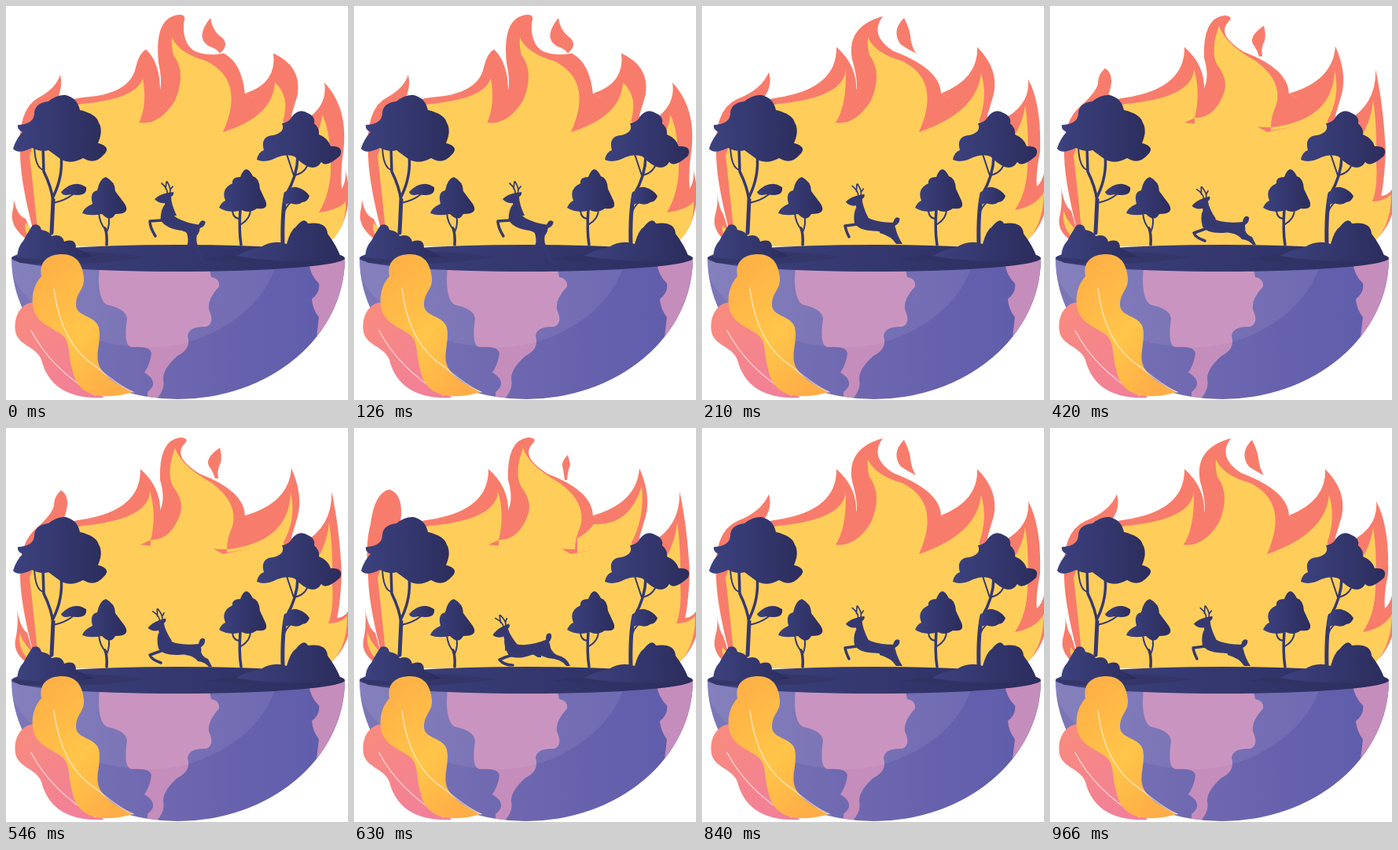
An HTML page without scripts for the animation above (1.05 s loop, 435 px wide and 500 px high).

```html
<!DOCTYPE html>
<html lang="en">
<head>
<meta charset="utf-8">
<title>Forest fire globe</title>
<style>
html, body { margin: 0; width: 100%; height: 100%; overflow: hidden; background: #fff; }
svg { display: block; width: 100%; height: 100%; }
.coral { fill: #f87c6b; }
.yellow { fill: #ffce5a; }
.pose { visibility: hidden; animation: 1050ms step-end infinite; }
.rise { animation-name: rise; }
.reach { animation-name: reach; }
.land { animation-name: land; }
.run { animation-name: run; }
@keyframes rise { 0% { visibility: visible; } 20%, 100% { visibility: hidden; } }
@keyframes reach { 0%, 40% { visibility: hidden; } 20%, 80%, 100% { visibility: visible; } }
@keyframes land { 0%, 60%, 100% { visibility: hidden; } 40% { visibility: visible; } }
@keyframes run { 0%, 80%, 100% { visibility: hidden; } 60% { visibility: visible; } }
.deer { fill: #363970; }
.line { fill: none; stroke: #363970; stroke-linecap: round; stroke-linejoin: round; }
.thin { stroke-width: 2; }
.mid { stroke-width: 3.5; }
.thick { stroke-width: 5; }
.vein { fill: none; stroke: #fff; stroke-opacity: .55; stroke-width: 1.6; stroke-linecap: round; }
</style>
</head>
<body>
<svg viewBox="0 0 435 500" preserveAspectRatio="none">
<defs>
  <linearGradient id="navy"><stop stop-color="#3c427f"/><stop offset="1" stop-color="#2c2d5d"/></linearGradient>
  <linearGradient id="sea"><stop stop-color="#7c77b8"/><stop offset=".6" stop-color="#6a63ae"/><stop offset="1" stop-color="#5d5cab"/></linearGradient>
  <linearGradient id="amber" x2=".7" y2="1"><stop stop-color="#ffac45"/><stop offset=".6" stop-color="#ffc549"/><stop offset="1" stop-color="#ffae47"/></linearGradient>
  <linearGradient id="rose" x2=".8" y2="1"><stop stop-color="#f98c7c"/><stop offset="1" stop-color="#f17f9a"/></linearGradient>
  <clipPath id="bowl"><path d="M7 320A212 179 0 0 0 431 320Z"/></clipPath>

  <path id="peak" d="M98 116Q172 104 171 52Q198 76 196 108Z"/>
  <path id="crest" d="M194 108Q204 92 196 66Q194 15 222 12Q234 13 227 20Q211 36 246 58Q304 80 304 112Z"/>
  <path id="east" d="M304 111Q360 95 363 51Q378 85 371 112L362 142Z"/>
  <path id="edge" d="M378 146Q416 124 414 80Q424 125 427 185Q425 225 421 241Q431 240 436 231V262Q425 295 400 305Z"/>
  <path id="west" d="M40 305Q5 290 13 264Q16 248 14 230Q18 254 27 260Z"/>
  <path id="core" d="M169 148Q195 152 215 120Q230 85 213 62Q210 52 211 40Q220 60 255 70Q305 95 276 160Z"/>
  <g id="glow">
    <path d="M45 305Q14 290 17 260Q24 278 38 288Z"/>
    <path d="M98 124Q182 116 183 80Q192 110 184 142L169 149Z"/>
    <path d="M184 142Q210 143 222 108Q226 92 213 75Q203 58 215 25Q222 48 262 70Q296 95 288 125Q281 140 281 154L184 150Z"/>
    <path d="M380 190Q408 155 411 120Q416 150 415 200Q417 230 410 248Q425 248 434 239Q434 285 405 305H350V190Z"/>
  </g>
  <path id="bodyFire" class="coral" d="M40 305Q19 230 18 190Q30 125 98 116L196 106 304 111 362 140 380 146 410 195 400 305Z"/>
  <path id="bodyGlow" class="yellow" d="M42 305Q37 250 30 190Q50 130 98 124L169 148 190 150 222 130 276 160 352 145 380 190 398 262V305Z"/>

  <g id="head">
    <path d="M-19 -5Q-13 -11 -2 -13L5 -14Q6 -10 2 -8Q2 1 9 16L-9 18Q-5 8 -6 0Q-14 1 -19 -5Z"/>
    <path class="line" stroke-width="1.7" d="M-3 -12Q-2 -18 -10 -25M-5 -18L-4 -27M0 -12Q3 -17 -3 -27M1 -17L4 -21"/>
  </g>
  <path id="trunk" d="M-6 4Q5 14 16 17Q30 20 45 18Q47 8 53 12Q54 18 48 22Q50 32 42 36Q30 30 20 32Q0 33 -6 24Q-9 12 -6 4Z"/>
</defs>

<use href="#bodyFire"/>
<g class="coral">
  <g class="pose rise">
    <path d="M18 190Q14 130 42 116Q64 104 69 87Q73 102 64 122Q80 128 98 116L60 160Z"/>
    <path d="M40 305Q4 285 8 262Q10 254 10 246Q14 266 25 270Z"/>
    <path d="M98 116Q158 112 165 78Q169 60 178 55Q196 72 196 107Z"/>
    <path d="M196 107Q199 95 194 72Q188 12 222 11Q230 12 226 21Q224 55 248 60Q262 63 277 60Q300 72 304 112Z"/>
    <path d="M304 111Q345 98 340 60Q376 76 371 112L362 142Z"/>
    <path d="M378 146Q410 128 405 97Q436 130 429 185Q425 210 427 232Q434 220 431 207Q440 235 433 262Q425 295 400 305Z"/>
    <path d="M260 15Q240 40 258 51Q268 54 272 60Q286 48 272 38Q262 30 260 15Z"/>
  </g>
  <g class="pose reach">
    <path d="M18 190Q14 132 45 118Q76 106 85 84Q91 104 74 122Q84 125 98 116L60 160Z"/>
    <path d="M40 305Q10 288 17 264Q21 250 19 238Q22 258 27 264Z"/>
    <use href="#peak"/>
    <path d="M196 108Q199 95 191 68Q183 26 230 13Q212 37 243 57Q304 80 304 112Z"/>
    <path d="M304 111Q352 92 350 52Q378 80 371 112L362 142Z"/>
    <path d="M378 146Q418 128 415 93Q432 125 430 185Q424 215 426 229Q435 220 436 205V262Q425 295 400 305Z"/>
    <path d="M257 15Q240 32 253 49Q262 55 272 60Q266 50 265 38Q264 29 257 15Z"/>
  </g>
  <g class="pose land">
    <path d="M18 190Q16 145 40 126Q62 106 61 96Q62 86 70 79Q85 88 72 119Q84 122 98 116L60 160Z"/>
    <use href="#west"/><use href="#peak"/><use href="#crest"/><use href="#east"/><use href="#edge"/>
    <path d="M272 25Q250 40 260 51Q264 57 266 64H270Q268 53 273 44Q275 36 272 25Z"/>
  </g>
  <g class="pose run">
    <path d="M18 190Q14 146 21 122Q26 82 45 78Q64 84 59 120Q78 126 98 116L60 160Z"/>
    <use href="#west"/><use href="#peak"/><use href="#crest"/><use href="#east"/><use href="#edge"/>
    <path d="M272 34Q262 44 266 52Q267 60 268 66H271Q272 54 275 46Z"/>
  </g>
</g>

<use href="#bodyGlow"/>
<g class="yellow">
  <g class="pose rise">
    <path d="M45 305Q20 292 25 275Q32 284 38 284Z"/>
    <path d="M98 124Q165 118 174 92Q180 125 169 149Z"/>
    <use href="#core"/>
    <path d="M276 160Q340 140 342 97Q362 115 352 147Z"/>
    <path d="M380 190Q402 155 402 138Q412 155 413 200Q414 235 398 262Q425 258 432 248Q434 285 405 305H350V190Z"/>
  </g>
  <g class="pose reach">
    <path d="M45 305Q23 294 26 278Q32 286 38 288Z"/>
    <path d="M98 124Q182 116 183 79Q184 130 169 149Z"/>
    <use href="#core"/>
    <path d="M276 160Q350 135 355 85Q364 115 352 147Z"/>
    <path d="M380 190Q408 155 411 126Q416 155 414 200Q414 235 398 259Q425 254 435 236Q434 285 405 305H350V190Z"/>
  </g>
  <g class="pose land">
    <use href="#glow"/>
    <path d="M281 154Q360 145 362 82Q370 115 352 147L281 158Z"/>
  </g>
  <g class="pose run">
    <use href="#glow"/>
    <path d="M284 140Q296 134 305 122Q350 125 366 74Q370 115 352 147L284 158Z"/>
  </g>
</g>

<g clip-path="url(#bowl)">
  <path fill="url(#sea)" d="M0 310H435V500H0Z"/>
  <g fill="#c58dbb">
    <path d="M119 330Q115 371 128 379Q153 384 154 397Q149 432 160 433Q184 431 185 441Q183 455 176 465Q196 477 180 490V500H190Q203 487 200 474Q199 461 218 444Q236 435 231 419Q232 406 255 407Q266 402 258 385Q256 372 271 356Q272 346 261 344L258 330Z"/>
    <path d="M385 325Q387 342 398 352Q400 363 389 372Q390 385 398 395L395 420H440V320Z"/>
  </g>
  <path fill="#fff" opacity=".07" d="M0 310H347C340 380 259 433 185 433C105 433 43 400 12 350Z"/>
</g>

<ellipse cx="219" cy="320" rx="212" ry="17" fill="url(#navy)"/>
<path fill="#343669" d="M7 319Q90 305 178 319Q100 331 18 326Z"/>
<path fill="#303264" d="M253 321Q340 304 430 319Q360 331 253 321Z"/>

<g class="deer">
  <g class="pose rise">
    <use href="#head" transform="translate(208 250)"/>
    <use href="#trunk" transform="translate(208 250) rotate(15) scale(.95)"/>
    <path class="line mid" d="M198 272L183 273Q183 281 190 292"/>
    <path d="M228 284L245 284Q240 296 244 304L253 327 248 325 239 305H230Q234 296 228 284Z"/>
  </g>
  <g class="pose reach">
    <use href="#head" transform="translate(202 253) rotate(-2)"/>
    <use href="#trunk" transform="translate(202 253) rotate(6) scale(.96)"/>
    <path class="line mid" d="M197 277L182 279Q183 285 187 293"/>
    <path d="M226 284L246 281Q248 291 255 302H247Q241 292 226 288Z"/>
  </g>
  <g class="pose land">
    <use href="#head" transform="translate(200 256) rotate(-8)"/>
    <use href="#trunk" transform="translate(200 256)"/>
    <path class="line mid" d="M197 283L183 288Q185 294 197 298"/>
    <path d="M228 285L248 277Q246 289 257 293L262 303H258Q253 297 244 296Q237 288 228 288Z"/>
  </g>
  <g class="pose run">
    <g transform="translate(196 263) rotate(-15)"><use href="#head"/><use href="#trunk"/></g>
    <path class="line mid" d="M203 288Q193 290 185 294Q191 301 202 301"/>
    <path d="M222 284L248 272Q250 284 258 288Q271 291 275 302H270Q264 293 247 292L238 289V291H234Z"/>
  </g>
</g>

<g class="line">
  <path class="thick" d="M58 288Q59 266 60 246M352 302Q351 262 356 238"/>
  <path class="mid" d="M60 248Q58 230 48 210L47 178M60 242Q73 216 70 188M128 303Q129 290 126 282M299 303Q296 285 298 258M356 240Q371 215 371 190"/>
  <path class="thin" d="M36 178Q37 206 48 208M60 250Q75 247 85 239M127 284Q119 276 118 262M128 287Q133 276 130 266M288 258Q288 270 298 270M299 277Q311 270 311 258M357 188L366 215Q382 212 385 197M353 266Q354 255 364 248"/>
</g>
<g fill="url(#navy)">
  <path d="M9 181Q13 168 21 160Q14 157 15 151Q35 150 36 137Q36 123 54 121Q65 112 76 113Q91 117 94 132Q115 137 118 148Q124 158 117 174Q135 179 124 189Q113 202 98 193Q82 202 69 194L54 183Q45 186 33 180Q15 189 9 181Z"/>
  <path d="M70 236Q86 219 102 230Q104 243 82 239Q72 242 70 236Z"/>
  <path d="M97 263Q99 256 110 251Q106 236 116 234Q119 219 127 217Q139 223 139 235L151 251Q159 264 139 264Q133 275 122 264Q106 267 97 263Z"/>
  <path d="M271 256Q274 249 279 247Q273 232 288 225Q287 217 298 217Q305 198 314 216Q322 218 323 232L330 247Q335 259 319 257Q309 264 300 259Q284 264 271 256Z"/>
  <path d="M319 195Q321 185 328 183Q323 165 340 164Q356 160 351 149Q361 147 364 140Q373 129 384 136Q394 140 392 149Q399 155 398 163Q410 168 413 178Q430 177 425 190Q407 206 401 198Q391 215 367 191Q357 187 345 192Q330 200 319 195Z"/>
  <path d="M352 249Q355 228 370 230Q381 233 386 241Q384 248 377 249Q371 254 361 250Q353 254 352 249Z"/>
  <path d="M14 319Q15 305 22 298Q29 285 34 278Q43 275 45 284Q56 286 58 292Q71 288 74 299Q89 294 89 307L112 318Q60 325 14 319Z"/>
  <path d="M292 317Q311 308 324 306Q340 296 357 302Q362 284 369 280Q379 267 384 276Q408 273 409 289Q420 303 426 319Q355 328 292 317Z"/>
</g>

<path fill="url(#rose)" d="M36 376C20 376 9 393 12 413C15 431 39 432 45 449Q58 500 124 497L60 390Z"/>
<path class="vein" d="M32 412Q57 460 114 494"/>
<path fill="url(#amber)" d="M72 315C51 315 42 326 45 343C34 355 31 373 36 388C43 405 62 409 72 418C82 427 79 443 84 460C90 494 118 502 162 490Q124 473 118 455C113 440 122 425 118 408C114 392 88 395 89 378C90 362 100 360 99 345Q96 315 72 315Z"/>
<path class="vein" d="M61 359Q70 430 115 458Q145 483 162 490"/>
</svg>
</body>
</html>
```
